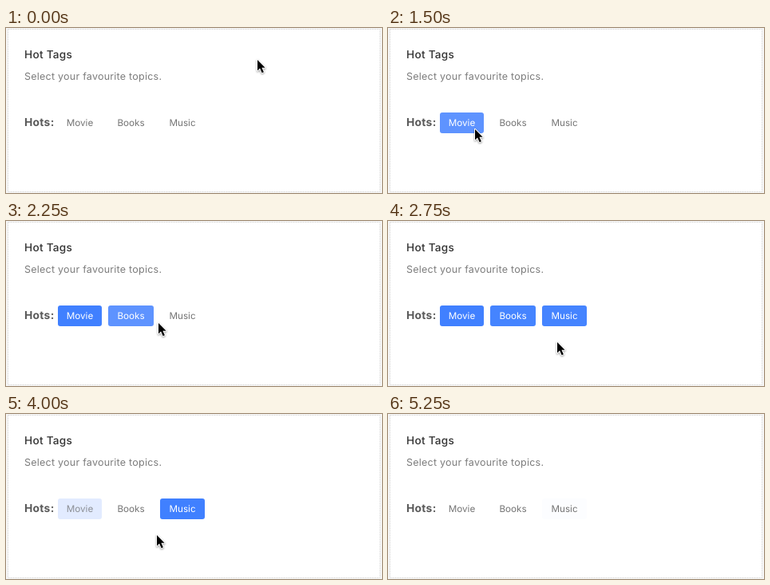
These frames come from a looping animation (471 px wide and 207 px high, 6000 ms). An HTML page:

```html
<!DOCTYPE html>
<html lang="en">
<head>
<meta charset="utf-8">
<title>Hot Tags</title>
<style>
html, body { margin: 0; width: 100%; height: 100%; overflow: hidden; background: #f7f7f7; }
svg { display: block; font-family: Inter, "Open Sans", sans-serif; text-rendering: geometricPrecision; }
.tag { font-size: 11.7px; }
</style>
</head>
<body>
<svg width="471" height="207" viewBox="0 0 471 207">
  <rect x="2.5" y="1.5" width="466" height="204" fill="#fff" stroke="#ddd" stroke-dasharray="2 1"/>
  <text x="23" y="38" font-size="13.6" font-weight="500" letter-spacing=".28" fill="#333">Hot Tags</text>
  <text x="23" y="65" font-size="12.5" letter-spacing=".24" fill="#7c7c7c">Select your favourite topics.</text>
  <text x="23" y="123" font-size="13.8" font-weight="700" letter-spacing=".3" fill="#5a5a5a">Hots:</text>
  <g id="tags"></g>
  <g id="cursor">
    <path d="M1 0V13.5L4.1 10.6L6.6 16.2L8.9 15.2L6.4 9.7H10.6Z" stroke="#fff" stroke-width="2"
      stroke-linejoin="round" paint-order="stroke" style="filter:drop-shadow(0 1px 1px #0006)"/>
  </g>
</svg>
<script>
const STEP = 250, LOOP = 6000;

// Tag looks: [background, text]
const off = ["#fff", "#757575"], hover = ["#e2ebff", "#8c8f96"], fading = ["#fcfdff", "#757575"],
  on = ["#4080ff", "#fff"], onHover = ["#5e93ff", "#fff"], settling = ["#4584ff", "#fff"];

// Each tag changes its look at the given times
const tags = [
  { name: "Movie", x: 65, w: 55, looks: [[0, off], [1000, hover], [1250, onHover], [1750, on], [3500, hover], [4250, off]] },
  { name: "Books", x: 128, w: 57, looks: [[0, off], [2000, onHover], [2500, on], [2750, settling],
    [3000, onHover], [3250, hover], [3500, fading], [3750, off]] },
  { name: "Music", x: 193, w: 56, looks: [[0, off], [2500, onHover], [2750, settling], [3000, on],
    [4750, hover], [5250, fading]] }
];

// Pointer position at every step; it is gone afterwards
const path = [
  [314, 40], [304, 51], [182, 50], [171, 49], [88, 118], [78, 121], [108, 127],
  [196, 144], [129, 114], [190, 128], [208, 120], [211, 152], [150, 120], [150, 131],
  [84, 113], [86, 113], [188, 152], [250, 145], [253, 150], [205, 114], [247, 136]
];

function add(parent, type, attrs) {
  const el = document.createElementNS("http://www.w3.org/2000/svg", type);
  for (const key in attrs) el.setAttribute(key, attrs[key]);
  return parent.appendChild(el);
}

const group = document.getElementById("tags");
const cursor = document.getElementById("cursor");
for (const tag of tags) {
  tag.box = add(group, "rect", { x: tag.x, y: 106, width: tag.w, height: 26, rx: 3 });
  tag.label = add(group, "text", { x: tag.x + tag.w / 2, y: 123, class: "tag", "text-anchor": "middle" });
  tag.label.textContent = tag.name;
}

function draw(now) {
  const t = now % LOOP;
  for (const { looks, box, label } of tags) {
    const [fill, ink] = looks.findLast(([start]) => start <= t)[1];
    box.setAttribute("fill", fill);
    label.setAttribute("fill", ink);
  }
  const spot = path[Math.floor(t / STEP)];
  cursor.setAttribute("visibility", spot ? "visible" : "hidden");
  if (spot) cursor.setAttribute("transform", `translate(${spot})`);
}

const begin = performance.now();
function tick() {
  draw(performance.now() - begin);
  requestAnimationFrame(tick);
}
tick();
</script>
</body>
</html>
```
